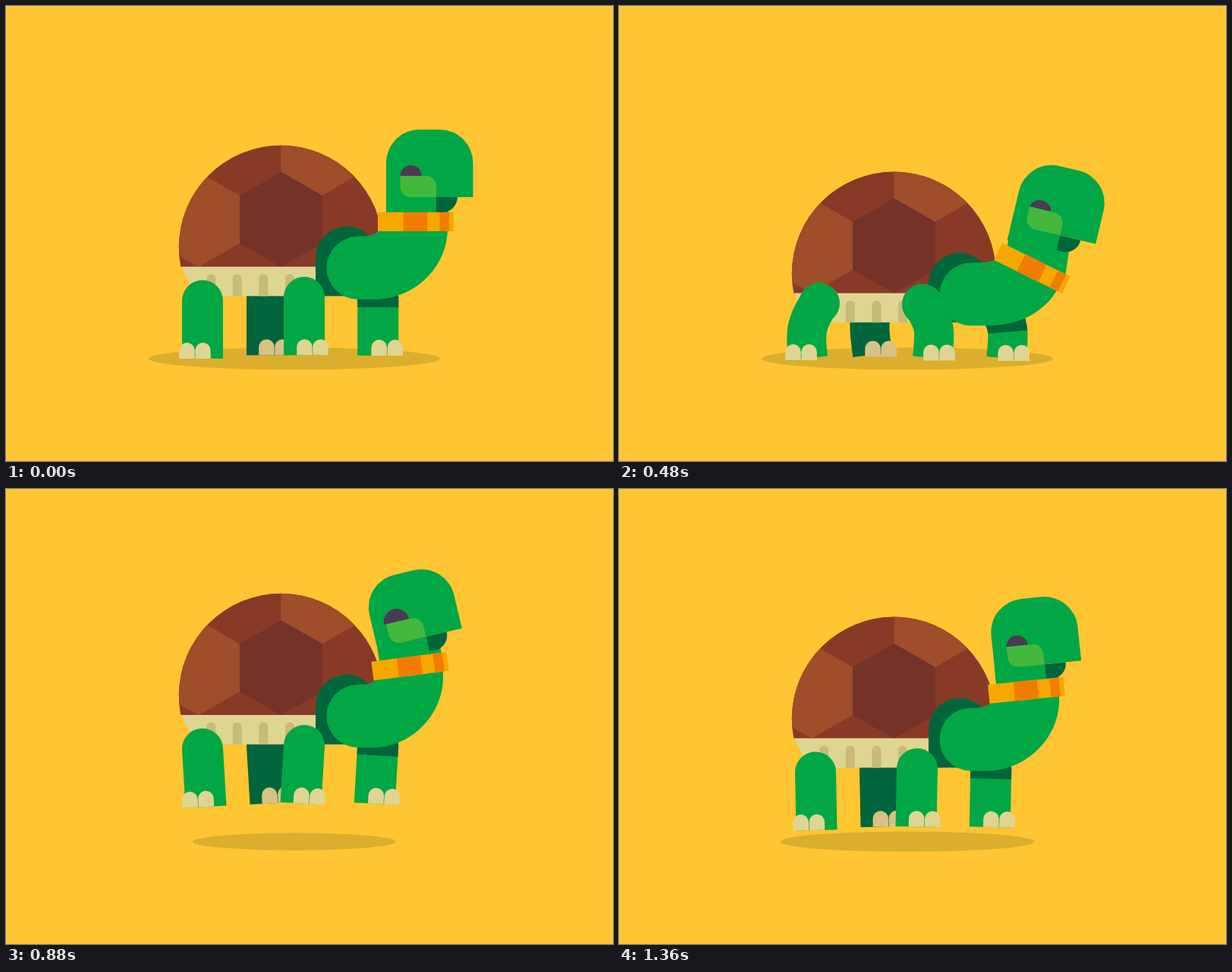
Animation of 800 by 600 pixels, one loop 1400 ms. Source, as an HTML page with a canvas:

```html
<!DOCTYPE html>
<html lang="en">
<head>
<meta charset="utf-8">
<title>Jumping turtle</title>
<style>
  html, body { margin: 0; width: 100%; height: 100%; overflow: hidden; background: #ffc533; }
  canvas { display: block; }
</style>
</head>
<body>
<canvas id="stage" width="800" height="600"></canvas>
<script>
const ctx = document.getElementById('stage').getContext('2d');
const LOOP = 1400, STEP = 40, PEAK = 1100, RAD = Math.PI / 180;
const GREEN = '#00a744', DARK = '#00653c', CREAM = '#dfd592', YELLOW = '#f6a800', ORANGE = '#f17d00';

// Cubic easing curve, solved for x by bisection
function bezier(x1, y1, x2, y2) {
  const at = (s, p, q) => 3 * s * (1 - s) ** 2 * p + 3 * s * s * (1 - s) * q + s ** 3;
  return x => {
    let lo = 0, hi = 1;
    for (let i = 0; i < 24; i++) {
      const mid = (lo + hi) / 2;
      if (at(mid, x1, x2) < x) lo = mid; else hi = mid;
    }
    return at(lo, y1, y2);
  };
}

const crouch = u => 1 - (1 - u) ** 2.8;
const leap = bezier(0.7, 0, 0.5, 1);
const drop = bezier(0.7, 0, 0.55, 0.3);
const relax = u => u ** 2.4;

// Rest at 0, sink to low at lowAt, rise to high at the peak, fall back to rest
function swing(t, low, high, lowAt, fall) {
  if (t < lowAt) return low * crouch(t / lowAt);
  if (t < PEAK) return low + (high - low) * leap((t - lowAt) / (PEAK - lowAt));
  return high * (1 - fall((t - PEAK) / (LOOP - PEAK)));
}

function fill(color, build) {
  ctx.fillStyle = color;
  ctx.beginPath();
  build();
  ctx.fill();
}

function poly(color, ...points) {
  fill(color, () => points.forEach(([x, y]) => ctx.lineTo(x, y)));
}

function arch(color, x, top, width, bottom) {
  const r = width / 2;
  fill(color, () => {
    ctx.arc(x + r, top + r, r, Math.PI, 0);
    ctx.lineTo(x + width, bottom);
    ctx.lineTo(x, bottom);
  });
}

function within(draw, x, y, angle = 0) {
  ctx.save();
  ctx.translate(x, y);
  ctx.rotate(angle * RAD);
  draw();
  ctx.restore();
}

function drawShadow(t) {
  let u = 1;
  if (t > 1110) u = (t - 1110) / 290;
  else if (t > 660) u = (1110 - t) / 450;
  const grow = 67 * u ** 3;
  fill('#dbae2e', () => ctx.ellipse(380, 465, 125 + grow, 11 + grow * 0.053, 0, 0, 7));
}

// dir -1 bends the knee backwards, 1 forwards
function drawLeg(dy, { x, hip, foot, dir, toe, slide, color = GREEN, toeColor = CREAM, band }) {
  const squat = Math.max(dy, 0) / 35, lift = Math.min(dy, 0);
  const [hy, fx, fy, tx, ty] = dir < 0 ? [3.5, -10, -0.5, -9, 2] : [9.5, 20, 4, 18, 7];
  const bend = dir * squat;
  const footX = (fx - slide) * squat, footY = foot - hip + (fy - hy) * squat;
  const limb = () => {
    ctx.beginPath();
    ctx.moveTo(0, 0);
    ctx.bezierCurveTo(bend * 18, 26, footX + bend * 4, footY - 34, footX, footY);
    ctx.stroke();
  };
  within(() => {
    fill(band ? DARK : color, () => ctx.arc(0, 0, 27, 0, 7));
    ctx.lineWidth = 54 - 2 * squat;
    ctx.strokeStyle = color;
    limb();
    if (band) {
      ctx.strokeStyle = DARK;
      ctx.setLineDash([13 + 27 * squat, 999]);
      limb();
    }
    const toeX = toe + (tx - slide) * squat, toeY = foot - hip + (ty - hy) * squat;
    arch(toeColor, toeX - 20.8, toeY - 21, 20.5, toeY);
    arch(toeColor, toeX + 0.3, toeY - 21, 20.5, toeY);
  }, x + slide * squat, hip + hy * squat + lift, -dir * lift * 0.0735);
}

function drawShell() {
  poly(CREAM, [231, 343], [470, 343], [470, 382.5], [250, 382.5]);
  for (let i = 0; i < 4; i++) arch('#c8ba78', 264.2 + i * 34.6, 353.5, 12, 382.5);
  ctx.save();
  ctx.beginPath();
  ctx.arc(362.3, 318.2, 134.5, 169 * RAD, 11 * RAD);
  ctx.clip();
  ctx.fillStyle = '#883a27';
  ctx.fillRect(220, 180, 285, 164);
  poly('#9f4d2a', [362.5, 170], [362.5, 219], [417, 250], [480, 213], [480, 170]);
  poly('#9f4d2a', [220, 199], [308, 250], [308, 313], [254, 344], [220, 325]);
  poly('#753228', [362.5, 219], [417, 250], [417, 313], [362.5, 344], [308, 313], [308, 250]);
  ctx.restore();
}

function drawNeck(collar, head) {
  const place = (o, x, y) => {
    const c = Math.cos(o.angle * RAD), s = Math.sin(o.angle * RAD);
    return [o.x + x * c - y * s, o.y + x * s + y * c];
  };
  const bottom = 386.8, right = place(collar, 42, 10);
  const handle = 0.55 * (bottom - right[1]);
  fill(GREEN, () => {
    ctx.arc(464, 345.3, 41.5, Math.PI / 2, -Math.PI / 2);
    ctx.lineTo(469, 303.8);
    ctx.quadraticCurveTo(483, 303.8, ...place(collar, -47, 11));
    ctx.lineTo(...right);
    ctx.bezierCurveTo(...place(collar, 41, 10 + handle), 485 + 0.55 * (right[0] - 485), bottom, 485, bottom);
  });
  poly(GREEN, place(collar, -39, 0), place(collar, 42, 0), place(collar, 43, -12),
    place(head, -33, 8), place(head, -114.5, 0));
}

function drawHead(eyeWidth, eyeHeight) {
  fill(GREEN, () => {
    ctx.moveTo(-114.5, 22);
    ctx.arc(-70.5, -45, 44, Math.PI, -Math.PI / 2);
    ctx.arc(-44, -45, 44, -Math.PI / 2, 0);
    ctx.lineTo(0, 0);
    ctx.lineTo(-48.5, 0);
    ctx.lineTo(-48.5, 22);
  });
  fill(DARK, () => {
    ctx.moveTo(-48.5, 0);
    ctx.lineTo(-20.5, 0);
    ctx.arc(-40.5, 0, 20, 0, Math.PI / 2);
    ctx.lineTo(-48.5, 20);
  });
  fill('#4a3b52', () => ctx.ellipse(-81.8, -28, eyeWidth, eyeHeight, 0, Math.PI, 0));
  fill('#44b83c', () => ctx.roundRect(-96, -28, 47.5, 28, [0, 14, 0, 14]));
}

function drawCollar() {
  ctx.fillStyle = YELLOW;
  ctx.fillRect(-50, -12.5, 100, 25);
  ctx.fillStyle = ORANGE;
  ctx.fillRect(-16.3, -12.5, 31.6, 25);
  ctx.fillRect(31.5, -12.5, 12.5, 25);
}

function draw(t) {
  const dy = swing(t, 37, -67, 360, drop);
  const nod = swing(t, 14, -20.5, 370, relax);
  const tilt = swing(t, 26.3, -20, 440, relax);
  const head = {
    x: 615.5 + 1.03 * nod - 0.006 * nod ** 2,
    y: 252 + 1.86 * nod + 0.012 * nod ** 2,
    angle: nod
  };
  const collar = {
    x: 540 + 0.45 * nod - 0.008 * nod ** 2,
    y: 284.5 + 0.75 * tilt + 0.01 * tilt ** 2,
    angle: tilt
  };
  const eye = 14 + (t > 560 && t < 1200 ? 3 * Math.sin(Math.PI * (t - 560) / 640) : 0);
  const squint = Math.max(dy, 0) * 0.07;

  ctx.fillStyle = '#ffc533';
  ctx.fillRect(0, 0, 800, 600);
  drawShadow(t);
  drawLeg(dy, { x: 344, hip: 384, foot: 460.5, dir: -1, toe: 10, slide: -1, color: DARK, toeColor: '#d6c283' });
  drawLeg(dy, { x: 490.3, hip: 384, foot: 461, dir: 1, toe: 12, slide: 7, band: true });
  within(() => {
    drawShell();
    arch(DARK, 408, 290.7, 82, 382.5);
    drawNeck(collar, head);
    within(() => drawHead(eye, eye - squint), head.x, head.y, head.angle);
    within(drawCollar, collar.x, collar.y, collar.angle);
  }, 0, dy);
  drawLeg(dy, { x: 259, hip: 388.5, foot: 465, dir: -1, toe: -10, slide: 5 });
  drawLeg(dy, { x: 393, hip: 384, foot: 460.5, dir: 1, toe: 11, slide: 7 });
}

function tick() {
  const t = performance.now() % LOOP;
  draw(Math.floor(t / STEP) * STEP);
  requestAnimationFrame(tick);
}
tick();
</script>
</body>
</html>
```
